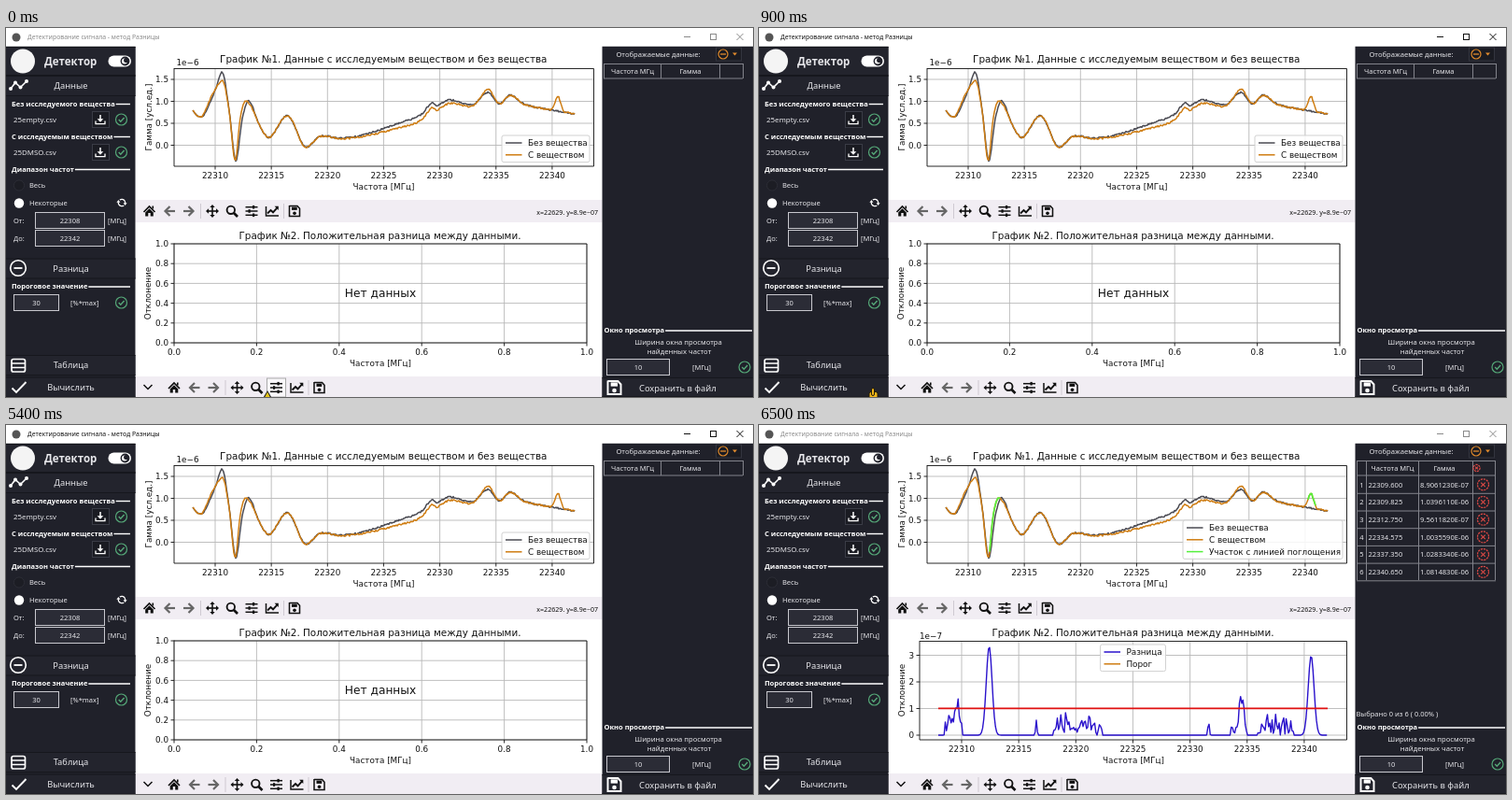
An HTML page with a canvas that plays this animation: 800 by 395 pixels, repeating every 6600 ms.

```html
<!DOCTYPE html>
<html lang="ru">
<head>
<meta charset="utf-8">
<title>Детектор</title>
<style>
html, body { margin: 0; width: 100%; height: 100%; overflow: hidden; background: #fff; }
canvas { display: block; width: 800px; height: 395px; }
</style>
</head>
<body>
<canvas id="stage"></canvas>
<script>
const LOOP = 6600;
const UI = '"Noto Sans", "Open Sans", sans-serif';
const PLOT = '"DejaVu Sans", sans-serif';
const PANEL = '#20212a', ROW = '#23242d', EDGE = '#16171d', FIELD = '#2b2c36', LIGHT = '#e6e6ea';
const INK = '#111', GRAY = '#4a4a52', ORANGE = '#cf7d12', GREEN = '#55f03c', BLUE = '#2a12cc', RED = '#e01010';

const canvas = document.getElementById('stage');
const g = canvas.getContext('2d');
const dpr = window.devicePixelRatio || 1;
canvas.width = 800 * dpr;
canvas.height = 395 * dpr;
g.scale(dpr, dpr);

// ---- helpers ----
function box(x, y, w, h, fill, stroke) {
  if (fill) { g.fillStyle = fill; g.fillRect(x, y, w, h); }
  if (stroke) { g.strokeStyle = stroke; g.lineWidth = 1; g.strokeRect(x + .5, y + .5, w - 1, h - 1); }
}
function paint(fill, stroke, lw) {
  if (fill) { g.fillStyle = fill; g.fill(); }
  if (stroke) { g.strokeStyle = stroke; g.lineWidth = lw; g.stroke(); }
}
function roundBox(x, y, w, h, r, fill, stroke, lw = 1) {
  g.beginPath();
  g.roundRect(x, y, w, h, r);
  paint(fill, stroke, lw);
}
function disc(x, y, r, fill, stroke, lw = 1) {
  g.beginPath();
  g.arc(x, y, r, 0, Math.PI * 2);
  paint(fill, stroke, lw);
}
function path(pts) {
  g.beginPath();
  for (let i = 0; i < pts.length; i += 2) g.lineTo(pts[i], pts[i + 1]);
}
function line(pts, color, lw = 1) { path(pts); paint(null, color, lw); }
function poly(pts, fill) { path(pts); g.closePath(); paint(fill); }

// y is the optical middle of the capitals
function text(s, x, y, size, { font = UI, color = LIGHT, align = 'left', weight = 400 } = {}) {
  g.font = `${weight} ${size}px ${font}`;
  g.fillStyle = color;
  g.textAlign = align;
  g.fillText(s, x, y + size * .36);
}
const mid = (s, x, y, size) => text(s, x, y, size, { align: 'center' });
const plotText = (s, x, y, size = 8.8, align = 'center') =>
  text(s, x, y, size, { font: PLOT, color: INK, align });
function at(x, y, draw) {
  g.save();
  g.translate(x, y);
  draw();
  g.restore();
}
function vertical(s, x, y) {
  at(x, y, () => { g.rotate(-Math.PI / 2); plotText(s, 0, 0); });
}

// ---- data ----
function random(seed) {
  return () => (seed = (seed * 16807) % 2147483647) / 2147483647;
}
const bump = (x, center, width) => Math.exp(-(((x - center) / width) ** 2));

// turning points of the signal, joined by a smooth curve
const KEYS = [[200, 89], [210, 95], [224, 67], [232, 48], [239, 88], [246, 142], [253, 97], [260, 78],
  [271, 103], [282, 117], [302, 94], [320, 127], [336, 116], [360, 118], [384, 114], [420, 102], [444, 93],
  [456, 80], [461, 83], [475, 77], [500, 82], [516, 69], [528, 81], [540, 72], [556, 82], [609, 92]];
const key = i => KEYS[Math.max(0, Math.min(KEYS.length - 1, i))];
function signal(x) {
  let i = 0;
  while (i < KEYS.length - 2 && key(i + 1)[0] < x) i++;
  const [a, b, c, d] = [-1, 0, 1, 2].map(k => key(i + k));
  const w = c[0] - b[0], u = Math.min(1, (x - b[0]) / w), u2 = u * u, u3 = u2 * u;
  const m0 = (c[1] - a[1]) / (c[0] - a[0]) * w, m1 = (d[1] - b[1]) / (d[0] - b[0]) * w;
  return (2 * u3 - 3 * u2 + 1) * b[1] + (u3 - 2 * u2 + u) * m0 + (3 * u2 - 2 * u3) * c[1] + (u3 - u2) * m1;
}
// the substance leads a little on rising edges, dips mid-band and adds its own peak
function absorbed(x) {
  const lead = 3 * bump(x, 255, 8) + 1.5 * bump(x, 218, 8);
  return signal(x + lead) + 9 * bump(x, 231, 5) + 6 * bump(x, 440, 50)
    - 4 * bump(x, 516, 8) - 16 * bump(x, 591, 4);
}
function trace(f, from, to, step, noise = 0, seed = 1) {
  const rnd = random(seed), out = [];
  for (let x = from; x <= to; x += step) out.push(x, f(x) + (rnd() - .5) * noise);
  return out;
}
const empty = trace(signal, 200, 609, 1, 1.7, 71);
const sample = trace(absorbed, 200, 609, 1, 1.7, 305);

// difference: [center, height, width] peaks and [from, to, height] noisy bursts
const BASE = 332;
const PEAKS = [[246.5, 95, 4.4], [591.3, 85, 4.4], [212.5, 22, 2], [517, 24, 2.5], [297, 16, 1], [481.5, 15, 1]];
const BURSTS = [[197, 219, 24], [315, 341, 26], [341, 368, 22], [505, 523, 26], [534, 573, 32]];
const spike = random(4242);
const difference = trace(x => {
  let h = 0;
  for (const [c, top, w] of PEAKS) h += top * bump(x, c, w);
  for (const [a, b, top] of BURSTS)
    if (x > a && x < b) h += top * spike() * Math.sqrt(Math.sin(Math.PI * (x - a) / (b - a)));
  return BASE - h;
}, 192, 609, 1.25);

// ---- icons ----
function arrow(dir) {
  line([dir * -.5, -5, dir * 4.5, 0, dir * -.5, 5], '#666', 2.2);
  line([dir * 4, 0, dir * -6, 0], '#666', 2.2);
}
const toolIcons = [
  [0, () => {
    line([-6, 1, 0, -5, 6, 1], INK, 1.7);
    poly([-4.3, 1.4, 0, -2.8, 4.3, 1.4, 4.3, 5.5, -4.3, 5.5], INK);
    box(-1.2, 2, 2.4, 4, '#f1edf3');
    box(3, -5.5, 1.6, 3, INK);
  }],
  [21.5, () => arrow(-1)],
  [42.5, () => arrow(1)],
  [67.5, () => {
    for (let i = 0; i < 4; i++) {
      g.rotate(Math.PI / 2);
      line([0, 0, 5, 0], INK, 1.6);
      poly([7, 0, 4, -2.7, 4, 2.7], INK);
    }
  }],
  [88.5, () => { disc(-1.2, -1.2, 4.2, null, INK, 1.9); line([2, 2, 6, 6], INK, 2.6); }],
  [109.5, () => {
    for (let i = -1; i < 2; i++) {
      const y = 4.3 * i;
      line([-6.5, y, 6.5, y], INK, 1.5);
      box(i ? 1 : -3.5, y - 1.8, 2.2, 3.6, INK);
    }
  }],
  [131.5, () => {
    line([-6.5, -5, -6.5, 5, 7, 5], INK, 1.5);
    line([-5, 2.5, -1.5, -1, 1, 1.3, 5.5, -3.7], INK, 1.9);
    poly([6.8, -5.2, 6.8, -1, 2.6, -5.2], INK);
  }],
  [155.5, () => disk(INK, 5.5)]
];
function disk(color, r) {
  line([-r, -r, r * .55, -r, r, -r * .5, r, r, -r, r, -r, -r - .5], color, r * .28);
  box(-r * .55, -r * .8, r * 1.05, r * .6, color);
  disc(0, r * .42, r * .33, color);
}
function toolbar(x, y, hover) {
  box(138.5, y - 12, 500, 24, '#f1edf3');
  if (hover) box(x + 99, y - 10.5, 21, 21, '#faf8fb', '#aaa');
  for (const [dx, icon] of toolIcons) at(x + dx, y, icon);
  for (const dx of [54.5, 143.5]) box(x + dx, y - 8, 1, 16, '#cfcad2');
}
function okMark(x, y) {
  disc(x, y, 6, null, '#55a878', 1.2);
  line([x - 2.8, y, x - .7, y + 2.3, x + 3.1, y - 2], '#55a878', 1.4);
}
function download(x, y) {
  box(x - 9, y - 9, 19, 18, '#1a1b22', '#3a3c46');
  line([x, y - 5, x, y + 1.5], '#fff', 1.5);
  poly([x - 3.3, y - .8, x + 3.3, y - .8, x, y + 2.8], '#fff');
  line([x - 5, y + 1.5, x - 5, y + 4.6, x + 5, y + 4.6, x + 5, y + 1.5], '#fff', 1.3);
}
function cross(x, y, d, color, lw = 1) {
  line([x - d, y - d, x + d, y + d], color, lw);
  line([x - d, y + d, x + d, y - d], color, lw);
}
function remove(x, y, r) {
  g.setLineDash([2.2, .9]);
  disc(x, y, r, null, '#e04a45', 1.2);
  g.setLineDash([]);
  cross(x, y, r * .38, '#e04a45', 1.1);
}
function refresh() {
  for (let i = 0; i < 2; i++) {
    g.rotate(Math.PI);
    g.beginPath();
    g.arc(0, 0, 3.7, -2.2, .2);
    paint(null, '#fff', 1.3);
    poly([1.6, .2, 5.6, .2, 3.6, 3], '#fff');
  }
}

// ---- window parts ----
function titleBar(active, frozen) {
  const ink = active ? INK : '#8a8a8a';
  box(0, 0, 800, 19.5, '#fff');
  disc(11, 10, 4.5, '#555');
  text('Детектирование сигнала - метод Разницы' + (frozen ? ' (Не отвечает)' : ''), 23, 10, 6.85, { color: ink });
  if (frozen) box(774, 0, 26, 19, '#dc1428');
  line([726, 9.5, 733, 9.5], ink);
  box(754, 6, 7, 7, null, ink);
  cross(786, 9.5, 3.5, frozen ? '#fff' : ink);
}
function rowBar(x, y, w, h) {
  box(x, y, w, h, ROW);
  box(x, y, w, 1, EDGE);
  box(x, y + h - 1, w, 1, EDGE);
}
function caption(s, x, y, end) {
  text(s, x, y, 7.5, { weight: 700, color: '#fff' });
  line([x + g.measureText(s).width + 1, y + .5, end, y + .5], '#fff', 1.4);
}
function field(x, y, w, value) {
  box(x, y, w, 18, FIELD, '#c8c8ce');
  mid(value, x + w / 2, y + 9, 7.5);
}
function leftPanel() {
  box(0, 19.5, 138.5, 376, PANEL);
  rowBar(0, 20, 138.5, 31);
  disc(18, 35.5, 13, '#f4f4f4');
  text('Детектор', 41, 36, 11.5, { weight: 600 });
  roundBox(109.5, 29.5, 24.5, 12, 6, '#fff');
  disc(127.5, 35.5, 4.9, PANEL);
  disc(127, 35.5, 3, '#fff');
  disc(128.7, 34.5, 2.6, PANEL);

  for (const [s, y] of [['Данные', 62], ['Разница', 257.5], ['Таблица', 361], ['Вычислить', 384.5]]) {
    rowBar(0, y - 11, 138.5, 22);
    mid(s, 69.5, y, 9.3);
  }
  const zig = [5, 65, 10, 58.5, 15.5, 63.5, 22, 57];
  line(zig, '#fff', 1.6);
  for (let i = 0; i < 8; i += 2) disc(zig[i], zig[i + 1], 2, '#fff');
  disc(13, 257, 8.3, null, '#fff', 1.6);
  line([8.5, 257, 17.5, 257], '#fff', 1.8);
  roundBox(6, 354.5, 14.5, 13.5, 2, null, '#fff', 1.7);
  for (const y of [359, 363.5]) line([6, y, 20, y], '#fff', 1.5);
  line([6.5, 385.5, 11, 390, 21.5, 379], '#fff', 1.9);

  const files = [['Без исследуемого вещества', '25empty.csv'], ['С исследуемым веществом', '25DMSO.csv']];
  files.forEach(([title, file], i) => {
    const y = 81 + 35 * i;
    caption(title, 6, y, 133);
    text(file, 8, y + 17, 7.9);
    download(101, y + 17);
    okMark(123.5, y + 17);
  });

  caption('Диапазон частот', 6, 151, 133);
  disc(14, 168.5, 5.6, '#1c1d24', '#2c2d36');
  disc(14, 187.5, 5.2, '#fff');
  text('Весь', 25, 168.5, 7.5);
  text('Некоторые', 25, 187.5, 7.5);
  at(124, 187, refresh);
  [['От:', '22308'], ['До:', '22342']].forEach(([s, value], i) => {
    const y = 206 + 19 * i;
    text(s, 8, y, 7.5);
    field(31, y - 9, 75, value);
    text('[МГц]', 109, y, 7.5);
  });

  caption('Пороговое значение', 6, 276.5, 133);
  field(8, 285, 49, '30');
  text('[%*max]', 69, 294, 7.5);
  okMark(123.5, 294);
}

const results = [
  ['22309.600', '8.9061230E-07'], ['22309.825', '1.0396110E-06'], ['22312.750', '9.5611820E-07'],
  ['22334.575', '1.0035590E-06'], ['22337.350', '1.0283340E-06'], ['22340.650', '1.0814830E-06']
];
const GRID = '#82838b';
function table(done) {
  const cols = done ? [640, 650, 706, 764, 788] : [640, 701, 764, 789];
  for (const x of cols) box(x, 38, 1, done ? 128 : 16, GRID);
  for (const y of [38, 53.5]) box(640, y, 149, 1, GRID);
  mid('Частота МГц', done ? 678.5 : 671, 46.5, 7.5);
  mid('Гамма', done ? 734 : 733, 46.5, 7.5);
  if (!done) return;
  remove(768.5, 46, 3.6);
  results.forEach(([freq, gamma], i) => {
    const y = 63.8 + i * 18.7;
    mid(i + 1, 645.5, y, 7.5);
    text(freq, 652.5, y, 7.6);
    text(gamma, 708, y, 7.6);
    remove(775.5, y, 6);
    box(640, y + 9, 149, 1, GRID);
  });
  text('Выбрано 0 из 6 ( 0.00% )', 639.5, 309.5, 7.5);
}
function rightPanel(done) {
  box(638.5, 19.5, 161.5, 376, PANEL);
  mid('Отображаемые данные:', 698.5, 28.5, 7.6);
  box(760, 20.5, 28, 15, '#1a1b22', '#33353f');
  disc(768, 28, 5, null, '#e08a2c', 1.2);
  line([765, 28, 771, 28], '#e08a2c', 1.3);
  poly([778, 26.5, 783, 26.5, 780.5, 29.5], '#e08a2c');
  table(done);
  caption('Окно просмотра', 640.5, 323.5, 799);
  mid('Ширина окна просмотра', 720, 336, 7.6);
  mid('найденных частот', 721, 346, 7.6);
  field(643, 354, 68, '10');
  text('[МГц]', 735, 363.5, 7.5);
  okMark(791, 363);
  rowBar(638.5, 374, 161.5, 21);
  at(651.5, 385, () => disk('#fff', 7));
  text('Сохранить в файл', 678, 385.5, 9.3);
}

// ---- plots ----
const ticks = (n, from, step, label) => Array.from({ length: n }, (_, i) => [from + step * i, label(i)]);
const mhz = i => 22310 + 5 * i;
const tenth = i => (i / 5).toFixed(1);

function axes(x0, y0, x1, y1, xs, ys, content) {
  for (const [x] of xs) line([x, y0, x, y1], '#b8b8b8', .9);
  for (const [y] of ys) line([x0, y, x1, y], '#b8b8b8', .9);
  for (const [x, s] of xs) { line([x, y1, x, y1 + 3.5], INK, .9); plotText(s, x, y1 + 9.5); }
  for (const [y, s] of ys) { line([x0 - 3.5, y, x0, y], INK, .9); plotText(s, x0 - 6, y, 8.8, 'right'); }
  content();
  line([x0, y0, x1, y0, x1, y1, x0, y1, x0, y0 - .5], INK, .9);
}
function legend(x, y, w, items) {
  roundBox(x, y, w, items.length * 12.8 + 3, 2, 'rgba(255,255,255,.85)', '#ccc', .9);
  items.forEach(([s, color], i) => {
    const cy = y + 8 + i * 12.8;
    line([x + 4, cy, x + 21.5, cy], color, 1.5);
    plotText(s, x + 28, cy, 8.8, 'left');
  });
}
function plotData(done) {
  plotText('График №1. Данные с исследуемым веществом и без вещества', 404.3, 33.5, 10.4);
  plotText('1e−6', 182.5, 37, 8.8, 'left');
  axes(180, 43.5, 629.5, 148, ticks(7, 224, 60.15, mhz), ticks(4, 125.5, -23.5, i => (i / 2).toFixed(1)), () => {
    line(empty, GRAY, 1.5);
    line(sample, ORANGE, 1.5);
    if (!done) return;
    for (const [from, to] of [[247, 259], [588, 597]])
      line(sample.slice((from - 200) * 2, (to - 200) * 2), GREEN, 1.7);
  });
  const items = [['Без вещества', GRAY], ['С веществом', ORANGE]];
  if (done) legend(454, 102, 171, [...items, ['Участок с линией поглощения', GREEN]]);
  else legend(531, 115, 94, items);
  plotText('Частота [МГц]', 404.5, 170);
  vertical('Гамма [усл.ед.]', 153, 95.5);
}
function plotDiff(done) {
  plotText('График №2. Положительная разница между данными.', 400.5, 222, 10.4);
  plotText('Частота [МГц]', 401, 358.5);
  vertical('Отклонение', done ? 153 : 152, 284);
  if (!done) {
    axes(180, 231, 622, 337, ticks(6, 180, 88.4, tenth), ticks(6, 337, -21.2, tenth),
      () => plotText('Нет данных', 401, 283.5, 12.2));
    return;
  }
  plotText('1e−7', 172, 225.5, 8.8, 'left');
  axes(172, 231.5, 629.5, 337, ticks(7, 217, 61.15, mhz), ticks(4, BASE, -28.5, i => i), () => {
    line(difference, BLUE, 1.4);
    line([192, 303.3, 609, 303.3], RED, 1.7);
  });
  legend(365.5, 235, 70, [['Разница', BLUE], ['Порог', ORANGE]]);
}

// glides to the compute button, then drops off the lower edge
function cursor(t) {
  if (t >= 1500) return;
  const u = Math.min(1, t / 500), ease = u * u * (3 - 2 * u);
  const y = 389.5 - 4 * ease + Math.max(0, t - 1100) / 400 * 11;
  at(280 - 158 * ease, y, () => {
    if (u < 1) {
      poly([0, -1.5, 5, 7, -5, 7], '#222');
      poly([0, .2, 3.5, 7, -3.5, 7], '#e6c619');
    } else {
      roundBox(-4, 4, 9, 9, 2, '#f0b51c', '#221c08');
      roundBox(-1.5, 0, 3, 8, 1.5, '#f0b51c', '#221c08');
    }
  });
}

function draw(now) {
  const t = Math.floor(now % LOOP / 100) * 100;
  const done = t >= 5500;
  box(0, 0, 800, 395, '#fff');
  g.lineJoin = 'round';
  plotData(done);
  plotDiff(done);
  g.lineJoin = 'miter';
  toolbar(153.5, 196, false);
  toolbar(180, 385, t < 100);
  line([147.5, 382, 152, 386.5, 156.5, 382], INK, 1.5);
  text('x=22629. y=8.9e−07', 634, 197, 7.1, { color: INK, align: 'right' });
  leftPanel();
  rightPanel(done);
  titleBar(t >= 800 && t < 6500, t >= 4600 && t < 5000);
  cursor(t);
}
const start = performance.now();
function tick() {
  draw(performance.now() - start);
  requestAnimationFrame(tick);
}
tick();
</script>
</body>
</html>
```
